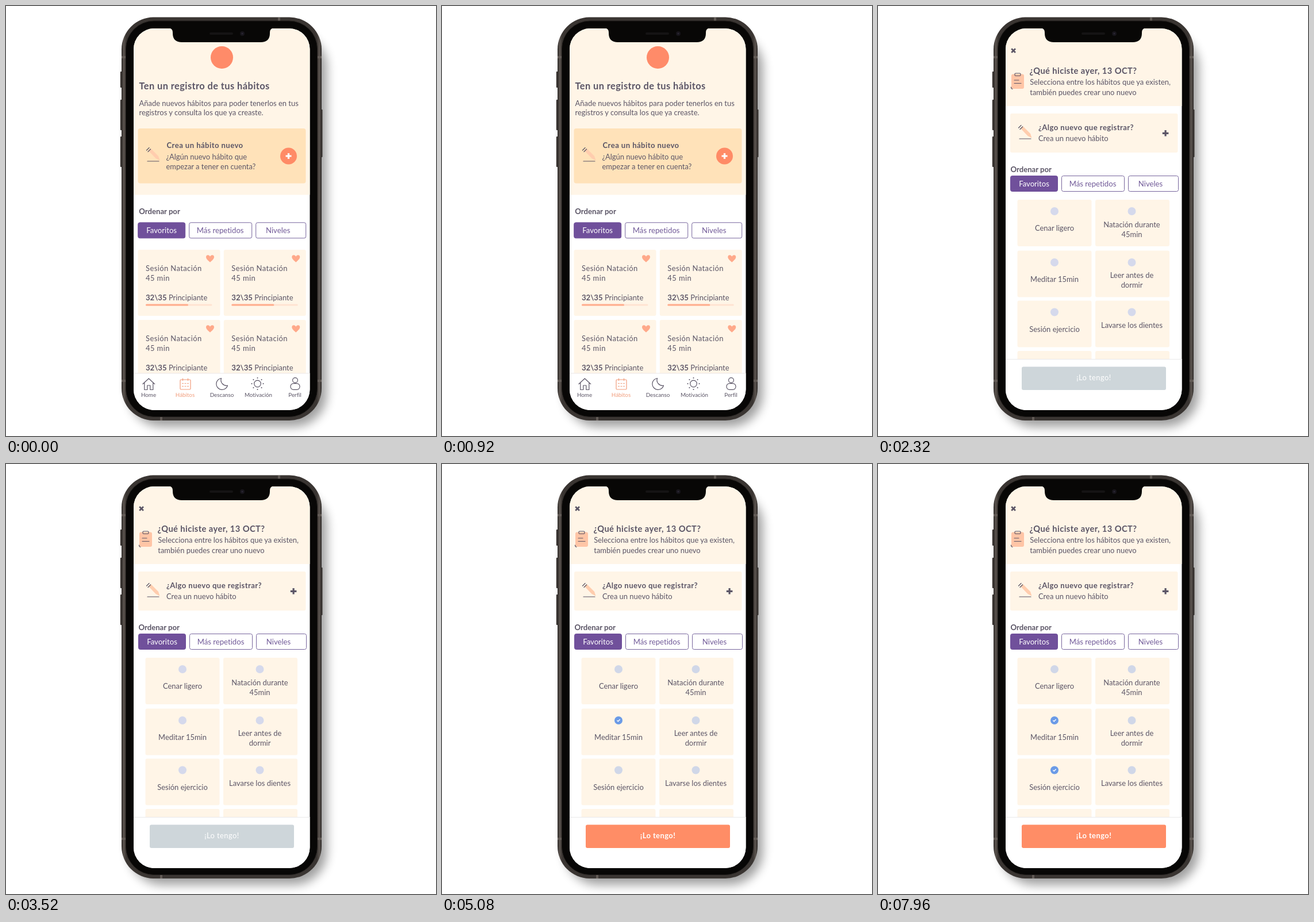
Write an HTML page that moves like this. It is 748 px wide and 748 px high and loops after 8000 ms.

```html
<!DOCTYPE html>
<html lang="es">
<head>
<meta charset="utf-8">
<title>Registro de hábitos</title>
<style>
html, body { margin: 0; width: 100%; height: 100%; overflow: hidden; background: #fff; }
svg { display: block; width: 100vw; height: 100vh; }
text { font: 12.95px Lato, sans-serif; font-variant-ligatures: none; fill: #5b5566; }
.bold { font-weight: 700; font-size: 13.15px; }
.wide { letter-spacing: .42px; }
.mid { text-anchor: middle; }
.nav text { font-size: 9.8px; text-anchor: middle; }
.cream { fill: #fff5e7; }
.line { fill: none; stroke: #5b5566; stroke-width: 1.2; stroke-linecap: round; stroke-linejoin: round; }
.thick { fill: none; stroke: #5b5566; stroke-width: 3.2; }
</style>
</head>
<body>
<svg viewBox="0 0 748 748">
  <defs>
    <filter id="blur" x="-20%" y="-20%" width="140%" height="140%"><feGaussianBlur stdDeviation="9"/></filter>
    <linearGradient id="rim">
      <stop offset="0" stop-color="#2b2725"/><stop offset=".01" stop-color="#5a534e"/>
      <stop offset=".024" stop-color="#3a3532"/><stop offset=".976" stop-color="#3a3532"/>
      <stop offset=".99" stop-color="#5a534e"/><stop offset="1" stop-color="#2b2725"/>
    </linearGradient>
    <clipPath id="screen"><rect x="222" y="39" width="306.500" height="664" rx="36"/></clipPath>
    <path id="heart" d="M0 6.200C-4 3-7 0-7-3C-7-7-2-7.500 0-3.800C2-7.500 7-7 7-3C7 0 4 3 0 6.200Z"/>
    <g id="pencil">
      <path d="M248 252L252 248 265 261 267.500 268.500 260.500 265Z" fill="#ffcdae"/>
      <path class="line" d="M244.500 251L249 246.500M247 253.500L251.500 249M246 270H266"/>
    </g>
  </defs>

  <rect x="214" y="48" width="344" height="684" rx="58" opacity=".38" filter="url(#blur)"/>
  <g fill="#3a3532">
    <rect x="198.800" y="114" width="4" height="28" rx="1"/>
    <rect x="198.800" y="163" width="4" height="53" rx="1"/>
    <rect x="198.800" y="227" width="4" height="53" rx="1"/>
    <rect x="546" y="180" width="4.500" height="83" rx="1"/>
  </g>
  <rect x="201" y="19.500" width="348" height="701.500" rx="56" fill="url(#rim)"/>
  <path d="M201 89H208M542 89H549M201 652H208M542 652H549M475 20V26M270 714V721" stroke="#625b56" stroke-width="4"/>
  <rect x="208.500" y="26" width="333" height="688.500" rx="49" fill="#080706" stroke="#1d1a18"/>

  <g clip-path="url(#screen)">
    <rect x="221" y="39" width="308" height="665" fill="#fff"/>

    <g id="overview">
      <rect class="cream" x="221" y="39" width="308" height="289.500"/>
      <circle cx="375.500" cy="89.500" r="19.500" fill="#ff8b69"/>
      <text class="bold wide" x="231.500" y="145.300" style="font-size:16.4px">Ten un registro de tus hábitos</text>
      <text x="231.500" y="173.500">Añade nuevos hábitos para poder tenerlos en tus</text>
      <text x="231.500" y="190.300">registros y consulta los que ya creaste.</text>
      <rect x="229.500" y="213" width="292" height="95.500" rx="4" fill="#ffe2b9"/>
      <use href="#pencil"/>
      <text class="bold wide" x="279.500" y="247">Crea un hábito nuevo</text>
      <text x="278.500" y="266.700">¿Algún nuevo hábito que</text>
      <text x="278.500" y="283.600">empezar a tener en cuenta?</text>
      <circle cx="491.500" cy="261" r="14.500" fill="#ff8b66"/>
      <path class="thick" d="M486.500 261H496.500M491.500 256V266" style="stroke:#fff"/>
      <text class="bold" x="231.300" y="362">Ordenar por</text>
      <g id="overviewTabs"></g>
      <g id="sessions"></g>
      <rect x="221" y="639" width="308" height="65" fill="#fff"/>
      <path d="M221 639H529" stroke="#ebe7e6"/>
      <g class="nav">
        <path class="line" d="M238 657.500L248.300 648 258.600 657.500M240.800 655.500V667.500H245.800V660H250.800V667.500H255.800V655.500"/>
        <text x="248" y="679.700">Home</text>
        <path class="line" d="M304.500 650H319.500Q321 650 321 651.500V665.500Q321 667 319.500 667H304.500Q303 667 303 665.500V651.500Q303 650 304.500 650ZM307.500 648V651.500M316.500 648V651.500M306.500 656.500H308.500M311 656.500H313M315.500 656.500H317.500M306.500 661.500H308.500M311 661.500H313M315.500 661.500H317.500" style="stroke:#f19c7b"/>
        <text x="311.500" y="679.700" style="fill:#f19c7b">Hábitos</text>
        <path class="line" d="M374.500 647.500A10 10 0 1 0 385.500 660A9.500 9.500 0 0 1 374.500 647.500Z"/>
        <text x="375.500" y="679.700">Descanso</text>
        <circle class="line" cx="437.500" cy="657" r="5.800"/>
        <circle class="line" cx="437.500" cy="657" r="10" pathLength="80" stroke-dasharray="0 10" style="stroke-width:2"/>
        <text x="439" y="679.700">Motivación</text>
        <circle class="line" cx="503" cy="651" r="4.400"/>
        <rect class="line" x="495" y="656.700" width="16" height="10.600" rx="5"/>
        <text x="502.500" y="679.700">Perfil</text>
      </g>
    </g>

    <g id="picker">
      <rect class="cream" x="221" y="39" width="308" height="135"/>
      <path class="thick" d="M232.200 74.200L239 81M239 74.200L232.200 81" style="stroke-width:2.700"/>
      <rect x="232" y="118.500" width="22" height="25.500" rx="3" fill="#ffc5a6"/>
      <rect class="line" x="238" y="117" width="10" height="4.500" rx="1.500"/>
      <path class="line" d="M237 129H245M237 134.500H249M231.500 141Q231.500 144 234 144.500"/>
      <text class="bold wide" x="263.500" y="117.700" style="font-size:14.7px">¿Qué hiciste ayer, 13 OCT?</text>
      <text x="264.300" y="137">Selecciona entre los hábitos que ya existen,</text>
      <text x="264.300" y="154.700">también puedes crear uno nuevo</text>
      <rect class="cream" x="230" y="187" width="291.500" height="68" rx="3"/>
      <use href="#pencil" y="-39"/>
      <text class="bold wide" x="279" y="215.500">¿Algo nuevo que registrar?</text>
      <text x="279" y="235">Crea un nuevo hábito</text>
      <path class="thick" d="M494.800 221.300H505.400M500.100 216V226.600"/>
      <text class="bold" x="230.500" y="288.500">Ordenar por</text>
      <g id="pickerTabs"></g>
      <g id="habits"></g>
      <rect x="221" y="614" width="308" height="90" fill="#fff"/>
      <path d="M221 614.500H529" stroke="#e9e9ea"/>
      <rect id="confirm" x="250" y="627.500" width="251" height="40.500" rx="3"/>
      <text id="confirmLabel" class="mid wide" x="375.500" y="650.800" style="fill:#fff">¡Lo tengo!</text>
    </g>
  </g>

  <path d="M283 38Q290 39 290 46V47.500Q290 63 306 63H443Q459 63 459 47.500V46Q459 39 466 38Z" fill="#080706"/>
  <rect x="354" y="46" width="41" height="4" rx="2" fill="#151314"/>
  <circle cx="411" cy="48" r="4" fill="#17151a"/>
  <circle cx="411" cy="48" r="1.500" fill="#2b2735"/>
</svg>
<script>
const LOOP = 8000, PICKER_AT = 2320, FIRST_CHECK = 4960, SECOND_CHECK = 6160;
const el = id => document.getElementById(id);

const tabs = (x, y) => [['Favoritos', 0, 83, 41.5], ['Más repetidos', 89, 110, 143.5], ['Niveles', 205, 88, 244]]
  .map(([label, dx, w, mid], i) => `
    <rect x="${x + dx + .5}" y="${y + .5}" width="${w - 1}" height="27" rx="3"
      fill="${i ? '#fff' : '#70509b'}" stroke="${i ? '#77659d' : '#70509b'}"/>
    <text class="mid" x="${x + mid}" y="${y + 18.6}" style="font-size:13.15px;fill:${i ? '#715a98' : '#fff'}">${label}</text>`).join('');

const session = (x, y) => `<g transform="translate(${x} ${y})">
  <rect class="cream" width="143" height="115" rx="3"/>
  <use href="#heart" x="125.5" y="15.5" fill="#ffa98a"/>
  <text class="wide" x="13.5" y="36.5">Sesión Natación</text>
  <text class="wide" x="13.5" y="53.5">45 min</text>
  <text x="13.5" y="87.6"><tspan class="bold">32\\35</tspan> Principiante</text>
  <g stroke-width="3" stroke-linecap="round">
    <path d="M15 96H127.5" stroke="#ffe3d2"/><path d="M15 96H86" stroke="#ffad8d"/>
  </g></g>`;

const habit = (lines, i) => {
  const x = i % 2 ? 378 : 242.5, row = i >> 1, y = [337, 425.5, 512.5, 600][row];
  const dotY = [357, 446, 532.5][row], mid = x + (i % 2 ? 63.5 : 64.5);
  const firstLine = lines.length > 1 || i === 5 ? 47.5 : 54;
  return `<rect class="cream" x="${x}" y="${y}" width="129" height="81" rx="3"/>` + (lines.length ? `
    <circle class="dot" cx="${mid}" cy="${dotY}" r="7"/>
    <path class="tick" d="M${mid - 2.5} ${dotY}l1.8 1.8 3.3-3.5" fill="none" stroke="#fff" stroke-width="1.4"/>` : '') +
    lines.map((s, n) => `<text class="mid" x="${mid}" y="${y + firstLine + 17 * n}">${s}</text>`).join('');
};

el('overviewTabs').innerHTML = tabs(229.2, 376.3);
el('pickerTabs').innerHTML = tabs(230, 295);
el('sessions').innerHTML = [424, 546].map(y => session(229.5, y) + session(378.8, y)).join('');
el('habits').innerHTML = [
  ['Cenar ligero'], ['Natación durante', '45min'],
  ['Meditar 15min'], ['Leer antes de', 'dormir'],
  ['Sesión ejercicio'], ['Lavarse los dientes'], [], []
].map(habit).join('');

const dots = document.querySelectorAll('.dot'), ticks = document.querySelectorAll('.tick');
const checkTimes = { 2: FIRST_CHECK, 4: SECOND_CHECK };

function draw() {
  const t = performance.now() % LOOP, picking = t >= PICKER_AT, active = t >= FIRST_CHECK;
  el('overview').style.display = picking ? 'none' : '';
  el('picker').style.display = picking ? '' : 'none';
  dots.forEach((dot, i) => {
    const checked = t >= checkTimes[i];
    dot.style.fill = checked ? '#6b9be7' : active ? '#d0d7e8' : '#d5d9ec';
    ticks[i].style.display = checked ? '' : 'none';
  });
  el('confirm').style.fill = active ? '#ff8d66' : '#ced6da';
  el('confirmLabel').style.fontWeight = active ? 700 : 400;
  requestAnimationFrame(draw);
}
draw();
</script>
</body>
</html>
```
